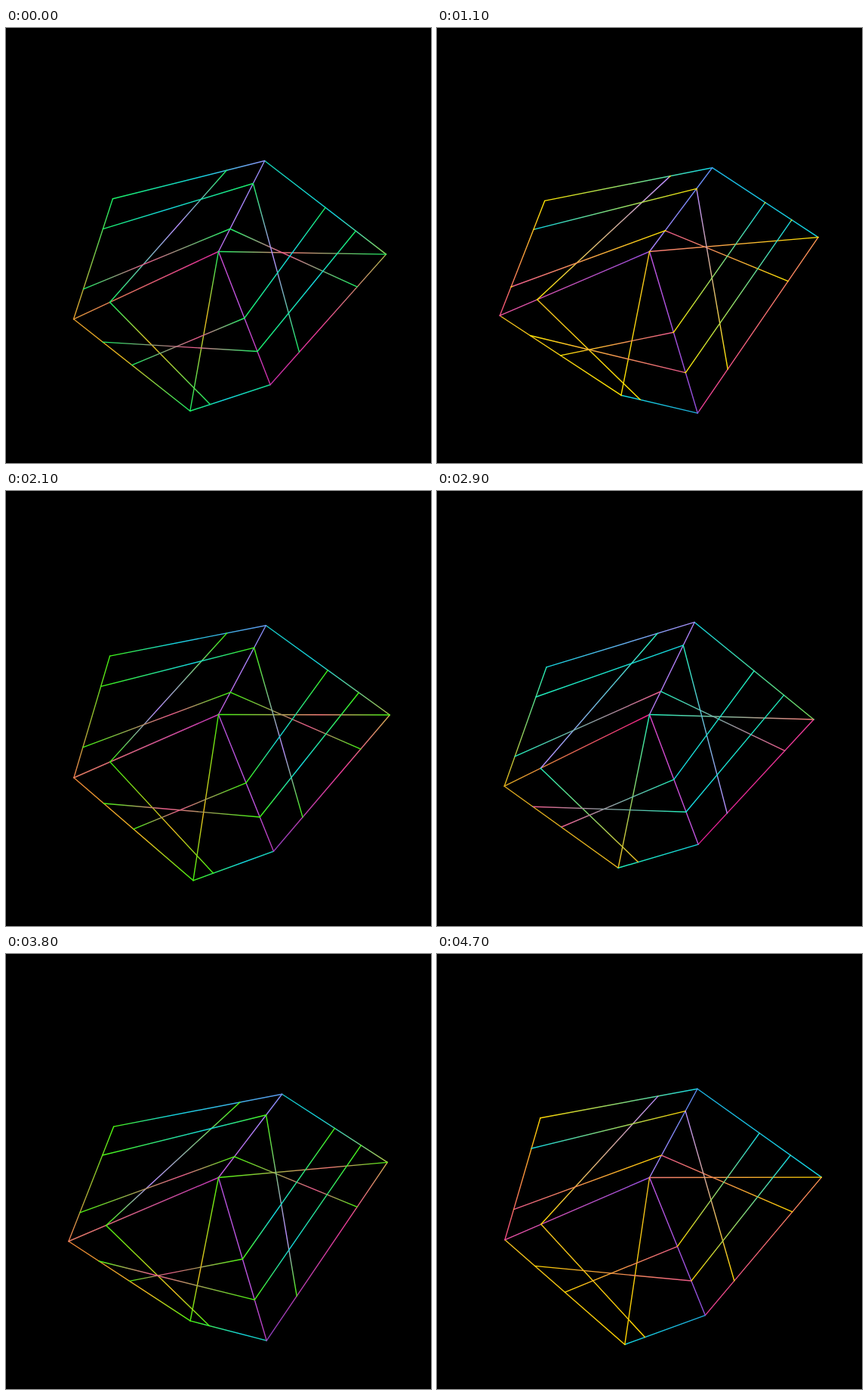
Animation, 563 px wide and 575 px high, one loop 4.8 s. Source, as an HTML page:

```html
<!DOCTYPE html>
<html lang="en">
<head>
<meta charset="utf-8">
<title>Wire cube</title>
<style>
  html, body { margin: 0; width: 100%; height: 100%; overflow: hidden; background: #000; }
  svg { display: block; width: 563px; height: 575px; }
  line { stroke-width: 1.4; stroke-linecap: round; }
</style>
</head>
<body>
<svg id="stage" viewBox="0 0 563 575"></svg>
<script>
const LOOP = 4800, STEP = 100;
const CENTER = [281.5, 295.5];

// Corner positions of the three poses the cube moves between.
const POSES = {
  wide: { A: [344.7, 178.2], B: [509.4, 295.4], C: [355.4, 477.2], D: [248.8, 516.6], E: [90, 377.8], F: [136.8, 216.6] },
  tall: { A: [341, 173.3], B: [498.7, 302.2], C: [345.8, 466.8], D: [239.8, 497.7], E: [89.2, 390.6], F: [145.2, 233.4] },
  turned: { A: [366.2, 185.5], B: [505.4, 274.8], C: [345.2, 512], D: [244.2, 484.6], E: [82.8, 379.5], F: [142.6, 228] }
};
const MOVES = [
  [-460, 'wide'], [380, 'tall'], [1150, 'turned'], [2015, 'wide'],
  [2927, 'tall'], [3820, 'turned'], [4710, 'wide'], [5600, 'tall']
];

// Time, hue progress, place of the coloured band along each line.
const TINTS = [
  [0, [0.21, 0.42]], [1150, [1, 0]], [2100, [0.5, 0.6]], [2900, [0, 1]],
  [3400, [0.18, 0.9]], [4200, [0.87, 0.42]], [4700, [1, 0]], [5900, [1, 0]]
];

const CYAN = '#14d7e1', PINK = '#eb5a8c', LILAC = '#b98cff', GOLD = '#f0be1e';

// [from, to, band, start colours, end colours]; a missing pair uses the shared accent.
const LINES = [
  ['A', 'F', CYAN, ['#aa8cfa', '#14a0dc']],
  ['B', 'A', CYAN, ['#78dc5a', '#e6b43c'], ['#14e1aa', '#1cb4e6']],
  ['C', 'B', '#eb3c96', ['#e61e96', '#325adc'], ['#a0c850', '#ff9650']],
  ['D', 'C', CYAN, null, ['#14e678', '#1eaadc']],
  ['E', 'D', GOLD, ['#dca81e', '#fa6450']],
  ['E', 'F', null, ['#e6b414', '#f04682']],
  ['O', 'E', null, ['#f01e8c', '#9650e0'], ['#dcaa1e', '#eb50a0']],
  ['O', 'A', '#aa82fa', ['#b478f0', '#d23cc8'], ['#a08cf5', '#5a8cf0']],
  ['O', 'B', '#f57878'],
  ['O', 'C', '#be55e1', ['#dc46c8', '#8c5ae6'], ['#e12396', '#8c50dc']],
  ['O', 'D', GOLD],
  ['AF1', 'OE3', LILAC],
  ['OE3', 'DC1', GOLD],
  ['FE1', 'AO1', CYAN],
  ['FE3', 'AO3', PINK],
  ['AO3', 'BC1', PINK],
  ['AO1', 'BC3', LILAC],
  ['AB2', 'OC2', CYAN],
  ['OC2', 'ED2', PINK],
  ['AB3', 'OC3', CYAN],
  ['OC3', 'ED1', PINK]
];

const mix = (a, b, k) => a.map((v, i) => v + (b[i] - v) * k);
const rgb = hex => [1, 3, 5].map(i => parseInt(hex.slice(i, i + 2), 16));
const blend = ([a, b], k) => `rgb(${mix(rgb(a), rgb(b), k).map(Math.round)})`;

function span(keys, t) {
  let i = 0;
  while (i < keys.length - 2 && keys[i + 1][0] <= t) i++;
  const [t0, a] = keys[i], [t1, b] = keys[i + 1];
  return [a, b, (t - t0) / (t1 - t0)];
}

function add(parent, tag, attrs = {}) {
  const node = document.createElementNS('http://www.w3.org/2000/svg', tag);
  set(node, attrs);
  parent.append(node);
  return node;
}
function set(node, attrs) {
  for (const key in attrs) node.setAttribute(key, attrs[key]);
}

const stage = document.getElementById('stage');
const defs = add(stage, 'defs');
const parts = LINES.map(([from, to, band, start, end], i) => {
  const gradient = add(defs, 'linearGradient', { id: 'g' + i, gradientUnits: 'userSpaceOnUse' });
  const first = add(gradient, 'stop', { offset: 0 });
  const middle = band && add(gradient, 'stop', { 'stop-color': band });
  const last = add(gradient, 'stop', { offset: 1 });
  const line = add(stage, 'line', { stroke: `url(#g${i})` });
  return { from, to, start, end, gradient, first, middle, last, line };
});

function draw(t) {
  const [poseA, poseB, k] = span(MOVES, t);
  const points = { O: CENTER };
  for (const name of 'ABCDEF') points[name] = mix(POSES[poseA][name], POSES[poseB][name], k);
  // "AB3" is the point three quarters of the way from A to B.
  const locate = name => points[name] || mix(points[name[0]], points[name[1]], name[2] / 4);

  const [tintA, tintB, m] = span(TINTS, t);
  const [hue, bandAt] = mix(tintA, tintB, m);
  const accent = `hsl(${165 - 115 * hue}, ${85 + 15 * hue}%, ${53 - 3 * hue}%)`;

  for (const p of parts) {
    const [x1, y1] = locate(p.from), [x2, y2] = locate(p.to);
    set(p.line, { x1, y1, x2, y2 });
    set(p.gradient, { x1, y1, x2, y2 });
    set(p.first, { 'stop-color': p.start ? blend(p.start, hue) : accent });
    set(p.last, { 'stop-color': p.end ? blend(p.end, hue) : accent });
    if (p.middle) set(p.middle, { offset: bandAt });
  }
}

const began = performance.now();
function tick() {
  const t = (performance.now() - began) % LOOP;
  draw(Math.floor(t / STEP) * STEP);
  requestAnimationFrame(tick);
}
tick();
</script>
</body>
</html>
```
